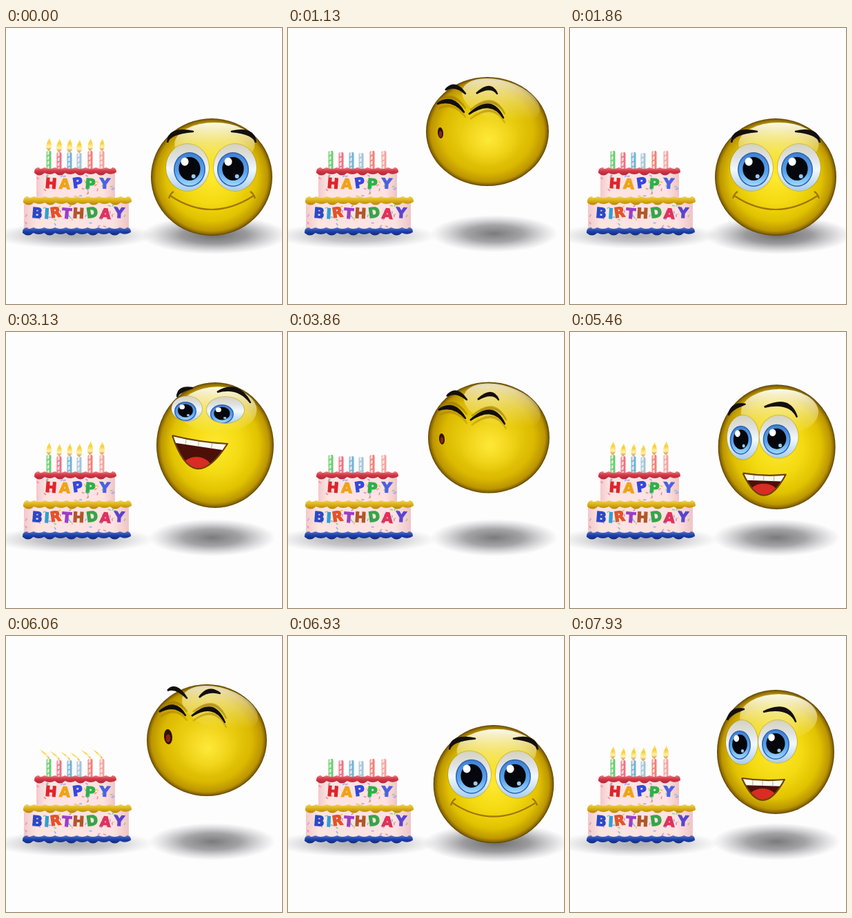
Animation, 400 px wide and 400 px high, one loop 8 s. Source, as an HTML page with a canvas:

```html
<!DOCTYPE html>
<html lang="en">
<head>
<meta charset="utf-8">
<title>Happy Birthday</title>
<style>
  html, body { margin: 0; width: 100%; height: 100%; overflow: hidden; background: #fefdfe; }
  canvas { display: block; width: 400px; height: 400px; }
</style>
</head>
<body>
<canvas id="stage" width="400" height="400"></canvas>
<script>
const ctx = document.getElementById('stage').getContext('2d');
const LOOP = 8000, STEP = 200 / 3, CYCLE = 39;
const TAU = Math.PI * 2;

// Face poses are relative to the ball's centre:
// eyes (white x, y, rx, ry, iris x, y, rx, ry), brows (three points), mouth (corners, lowest point, openness)
const SMILE = [
  -35, -14, 31, 34, -32, -11, 23, 25,   34, -14, 31, 34, 31, -11, 23, 25,
  -64, -50, -54, -63, -27, -66,   64, -50, 54, -63, 29, -66,
  -60, 27, 61, 27, 0, 47, 0];
const GRIN = [
  -49, -14, 23, 32, -52, -10, 16, 21,   3, -15, 28, 31, 0, -11, 20, 22,
  -70, -46, -62, -57, -46, -62,   -18, -58, 12, -61, 29, -44,
  -49, 38, 13, 40, -19, 70, 1];
const LAUGH = [
  -41, -53, 22, 18, -43, -49, 16, 14,   15, -51, 27, 19, 10, -45, 17, 14,
  -55, -70, -49, -79, -33, -83,   3, -77, 30, -80, 51, -62,
  -62, -14, 18, -2, -27, 34, 1];
// Brows, squeezed lids, then the mouth ellipse
const BLOW_OPEN = [
  -57, -72, -44, -74, -29, -61,   -11, -62, 3, -71, 19, -68,
  -69, -41, -48, -48, -31, -36,   -22, -35, 6, -45, 26, -26,
  -56, -5, 6, 11];
const BLOW_TIGHT = [
  -61, -60, -47, -65, -32, -55,   -16, -55, 2, -63, 14, -55,
  -73, -40, -52, -43, -34, -28,   -27, -25, 2, -37, 23, -20,
  -68, 2, 4, 8];

const bodyTrack = [
  [0, [298, 216, 88, 85]], [1, [298, 188, 86, 88]], [2, [298, 168, 85, 90]],
  [8, [303, 164, 85, 91]], [13, [291, 151, 87, 81]], [17, [289, 150, 89, 79]],
  [21, [293, 156, 87, 82]], [25, [298, 214, 87, 86]], [28, [298, 216, 88, 85]],
  [32, [298, 213, 87, 87]], [36, [298, 214, 87, 86]], [39, [298, 216, 88, 85]]];
const faceTrack = [
  [0, SMILE], [2, GRIN], [5, GRIN], [8, LAUGH], [10, LAUGH], [20, GRIN], [24, SMILE], [39, SMILE]];
const blowTrack = [[11, BLOW_OPEN], [13, BLOW_OPEN], [17, BLOW_TIGHT], [20, BLOW_TIGHT]];

const mix = (a, b, p) => a + (b - a) * p;
const clamp = v => Math.max(0, Math.min(1, v));

function sample(track, k) {
  let i = 0;
  while (i < track.length - 2 && k >= track[i + 1][0]) i++;
  const [k0, a] = track[i], [k1, b] = track[i + 1];
  const p = clamp((k - k0) / (k1 - k0));
  return a.map((v, n) => mix(v, b[n], p));
}

function shade(gradient, stops) {
  stops.forEach(([at, color]) => gradient.addColorStop(at, color));
  return gradient;
}
const vertical = (y0, y1, ...stops) => shade(ctx.createLinearGradient(0, y0, 0, y1), stops);

function ellipse(x, y, rx, ry, fill, rot = 0) {
  ctx.beginPath();
  ctx.ellipse(x, y, rx, ry, rot, 0, TAU);
  ctx.fillStyle = fill;
  ctx.fill();
}

// Radial gradient stretched into an ellipse
function glow(x, y, rx, ry, ...stops) {
  ctx.save();
  ctx.translate(x, y);
  ctx.scale(rx, ry);
  ellipse(0, 0, 1, 1, shade(ctx.createRadialGradient(0, 0, 0, 0, 0, 1), stops));
  ctx.restore();
}

const shadow = (x, y, rx, ry, alpha) => glow(x, y, rx, ry,
  [0, `rgba(60,60,64,${alpha})`], [.45, `rgba(70,70,74,${alpha * .72})`],
  [.8, `rgba(90,90,94,${alpha * .25})`], [1, 'rgba(110,110,110,0)']);

// Tapered stroke passing through three points
function crescent([x0, y0, mx, my, x1, y1], width, color) {
  const cx = 2 * mx - (x0 + x1) / 2, cy = 2 * my - (y0 + y1) / 2;
  ctx.beginPath();
  ctx.moveTo(x0, y0);
  ctx.quadraticCurveTo(cx, cy - width, x1, y1);
  ctx.quadraticCurveTo(cx, cy + width, x0, y0);
  ctx.fillStyle = ctx.strokeStyle = color;
  ctx.lineWidth = 2.5;
  ctx.lineJoin = 'round';
  ctx.fill();
  ctx.stroke();
}

function icing(x0, x1, top, bottom, count, colors) {
  const w = (x1 - x0) / count;
  ctx.beginPath();
  ctx.moveTo(x0, bottom - 4);
  ctx.quadraticCurveTo(x0, top, x0 + 7, top);
  for (let i = 0; i < count; i++) {
    const x = x0 + i * w;
    ctx.quadraticCurveTo(x + w / 2, top + 4, Math.min(x + w, x1 - 6), top);
  }
  ctx.quadraticCurveTo(x1, top, x1, bottom - 4);
  for (let i = count; i > 0; i--) {
    const x = x0 + i * w;
    ctx.quadraticCurveTo(x - w / 2, bottom + (i % 2 ? 4 : 1), x - w, bottom - 3);
  }
  ctx.fillStyle = vertical(top, bottom, [0, colors[0]], [.45, colors[1]], [1, colors[2]]);
  ctx.fill();
}

function tier(x, y, w, h, seed) {
  ctx.fillStyle = shade(ctx.createLinearGradient(x, 0, x + w, 0),
    [[0, '#f3c9cb'], [.12, '#fde4e3'], [.85, '#fde2e2'], [1, '#f0c4c6']]);
  ctx.fillRect(x, y, w, h);
  const random = () => (seed = seed * 16807 % 2147483647) / 2147483647;
  for (let i = 0; i < w / 4; i++) {
    ctx.fillStyle = ['#f08aa0', '#8db5ea', '#efc65c', '#8bd08e', '#c79ae0'][i % 5];
    ctx.save();
    ctx.translate(x + 2 + random() * (w - 4), y + 4 + random() * (h - 8));
    ctx.rotate(random() * 3);
    ctx.fillRect(-2, -.8, 4, 1.6);
    ctx.restore();
  }
}

function lettering(word, xs, y, size, colors) {
  ctx.font = `bold ${size}px "DejaVu Sans", sans-serif`;
  ctx.textAlign = 'center';
  ctx.textBaseline = 'middle';
  [...word].forEach((letter, i) => {
    ctx.save();
    ctx.translate(xs[i], y + Math.sin(i * 2.3));
    ctx.rotate(Math.sin(i * 2.1 + .6) * .14);
    ctx.strokeStyle = ctx.fillStyle = colors[i];
    ctx.lineWidth = 1.4;
    ctx.strokeText(letter, 0, 0);
    ctx.fillText(letter, 0, 0);
    ctx.restore();
  });
}

const CANDLES = [[62, 178, '#66cf72'], [77, 180, '#ee7182'], [92, 180, '#6fb5d8'],
  [106, 181, '#9fc7dc'], [122, 178, '#ed8078'], [139, 178, '#f0a5a0']];

function candle(x, y, color) {
  ctx.fillStyle = shade(ctx.createLinearGradient(x - 3.5, 0, x + 3.5, 0),
    [[0, color], [.45, '#fff0ec'], [.7, color], [1, color]]);
  ctx.beginPath();
  ctx.roundRect(x - 3.5, y, 7, 27, 2);
  ctx.fill();
  ctx.strokeStyle = color;
  ctx.lineWidth = 1.6;
  for (let s = 5; s < 24; s += 7) {
    ctx.beginPath();
    ctx.moveTo(x - 3, y + s + 3);
    ctx.lineTo(x + 3, y + s);
    ctx.stroke();
  }
}

function flame(x, y, size, lean) {
  const h = mix(19, 14, lean) * size, w = mix(4.2, 2, lean) * size;
  const tipX = x + 1 - lean * 15;
  ctx.beginPath();
  ctx.moveTo(x, y);
  ctx.bezierCurveTo(x - w * 1.5, y - 3, x - w - lean * 5, y - h * .5, tipX, y - h);
  ctx.bezierCurveTo(x + w - lean * 5, y - h * .5, x + w * 1.5, y - 3, x, y);
  ctx.fillStyle = vertical(y - h, y, [0, '#ffe98a'], [.35, '#f7cf35'], [.7, '#fff3b0'], [1, '#d98e2a']);
  ctx.fill();
}

function cake(k) {
  shadow(98, 301, 118, 19, .42);
  CANDLES.forEach(c => candle(...c));
  tier(44, 210, 114, 38, 77);
  icing(41, 160, 202, 213, 8, ['#e98087', '#d23a48', '#b32736']);
  tier(26, 252, 152, 40, 911);
  icing(25, 182, 244, 256, 10, ['#f2d35a', '#dfb41b', '#b88808']);
  icing(24, 181, 289, 300, 10, ['#5678cf', '#2145ae', '#112a7c']);
  lettering('HAPPY', [65, 85, 104, 122, 143], 227, 20,
    ['#e0242c', '#f0a316', '#3448dc', '#2eb04a', '#4c62e0']);
  lettering('BIRTHDAY', [45, 59, 72, 88, 105, 125, 144, 164], 270, 20,
    ['#2a49c4', '#2f9fd0', '#e3532a', '#9a3fc4', '#b0572c', '#35a548', '#e0325c', '#5a45cf']);

  const lit = k < 15 ? 1 : clamp((k - 33) / 3);
  const lean = k < 15 ? clamp((k - 11) / 2) : 0;
  if (lit && k !== 14) CANDLES.forEach(([x, y], i) =>
    flame(x, y, lit * (1 + .05 * Math.sin(k * 2.1 + i)), lean));
}

function ball([cx, cy, rx, ry], blowing) {
  glow(cx, cy, rx, ry, [0, '#ffe92e'], [.45, '#f3da12'], [.75, '#e1c200'],
    [.92, '#bd9700'], [.97, '#8f6c00'], [1, '#5c4300']);
  ctx.save();
  ctx.translate(cx, cy);
  ctx.scale(rx, ry);
  if (blowing) {
    ellipse(0, 0, .95, .95, 'rgba(190,145,0,.2)');
    ellipse(.02, .15, .55, .5, shade(ctx.createRadialGradient(.02, .15, 0, .02, .15, .5),
      [[0, 'rgba(255,235,60,.9)'], [1, 'rgba(255,225,40,0)']]));
  }
  ellipse(blowing ? .22 : .05, -.56, .66, .37,
    vertical(-.93, -.2, [0, `rgba(255,255,248,${blowing ? .72 : .95})`], [1, 'rgba(255,250,190,0)']),
    blowing ? .35 : 0);
  ctx.restore();
}

function eye([x, y, rx, ry, ix, iy, irx, iry]) {
  ellipse(x, y, rx + 1, ry + 1, 'rgba(150,125,40,.4)');
  ellipse(x, y, rx, ry, vertical(y - ry, y + ry,
    [0, '#d6d2bd'], [.3, '#dfe2e2'], [.55, '#f2f8fd'], [1, '#a9cdee']));
  ctx.save();
  ctx.clip();
  ellipse(ix, iy, irx, iry, '#2c62b0');
  ellipse(ix, iy, irx - 1.5, iry - 1.5, vertical(iy - iry, iy + iry,
    [0, '#3f7fd2'], [.6, '#5aa5ee'], [1, '#a4dcff']));
  ellipse(ix, iy - 1, irx * .68, iry * .68, '#05070c');
  ellipse(ix - irx * .3, iy - iry * .45, irx * .24, iry * .24, '#fff');
  ellipse(ix + irx * .25, iy + iry * .4, irx * .13, iry * .12, '#9cc9f2');
  ctx.restore();
}

function mouth([x0, y0, x1, y1, bx, by, open]) {
  const midY = (y0 + y1) / 2;
  const lowY = 2 * by - midY, lowX = 2 * bx - (x0 + x1) / 2;
  const topY = mix(lowY, midY + 4, open), topX = mix(lowX, (x0 + x1) / 2, open);
  ctx.beginPath();
  ctx.moveTo(x0, y0);
  ctx.quadraticCurveTo(lowX, lowY, x1, y1);
  ctx.quadraticCurveTo(topX, topY, x0, y0);
  if (open > .1) {
    ctx.fillStyle = '#4d1008';
    ctx.fill();
    ctx.save();
    ctx.clip();
    ellipse(bx, by - 2, 21, 15, '#d92c22');
    ctx.translate(x0, y0);
    ctx.rotate(Math.atan2(y1 - y0, x1 - x0));
    const width = Math.hypot(x1 - x0, y1 - y0);
    ctx.fillStyle = '#fbfaf4';
    ctx.beginPath();
    ctx.roundRect(2, -2, width - 4, 12, 4);
    ctx.fill();
    ctx.fillStyle = '#b9aa9c';
    [.25, .48, .72].forEach(p => ctx.fillRect(width * p, 2, 1, 8));
    ctx.restore();
  }
  ctx.beginPath();
  ctx.moveTo(x0, y0);
  ctx.quadraticCurveTo(lowX, lowY, x1, y1);
  ctx.quadraticCurveTo(topX, topY, x0, y0);
  ctx.strokeStyle = open > .4 ? '#6b4300' : '#a27500';
  ctx.lineWidth = 2.2;
  ctx.stroke();
  if (open < .3) {
    ctx.beginPath();
    ctx.moveTo(x0 - 2, y0 + 4);
    ctx.quadraticCurveTo(x0, y0 - 3, x0 + 5, y0 - 6);
    ctx.moveTo(x1 + 2, y1 + 4);
    ctx.quadraticCurveTo(x1, y1 - 3, x1 - 5, y1 - 6);
    ctx.stroke();
  }
}

function openFace(f) {
  eye(f.slice(0, 8));
  eye(f.slice(8, 16));
  crescent(f.slice(16, 22), 5, '#14100c');
  crescent(f.slice(22, 28), 5, '#14100c');
  mouth(f.slice(28));
}

function blowFace(f) {
  [12, 18].forEach(n => {
    const lid = f.slice(n, n + 6);
    const fold = lid.map((v, i) => i % 2 ? v - 6 : v + 2);
    const under = lid.map((v, i) => i % 2 ? v + 7 : v + 2);
    crescent(fold, 3, 'rgba(160,125,0,.5)');
    crescent(under, 2, 'rgba(165,125,0,.35)');
    crescent(lid, 4.5, '#120e08');
  });
  crescent(f.slice(0, 6), 4, '#14100c');
  crescent(f.slice(6, 12), 4, '#14100c');
  const [x, y, rx, ry] = f.slice(24);
  ellipse(x, y, rx, ry, '#2d1400', -.08);
  ellipse(x, y + ry * .2, rx * .55, ry * .55, '#8d2412');
}

function draw(now) {
  const k = Math.floor((now % LOOP + 8) / STEP) % 120 % CYCLE;
  const body = sample(bodyTrack, k);
  const blowing = k >= 11 && k < 20;
  const lift = clamp((216 - body[1]) / 50);

  ctx.fillStyle = '#fefdfe';
  ctx.fillRect(0, 0, 400, 400);
  cake(k);
  shadow(mix(302, 299, lift), mix(300, 298, lift), mix(106, 92, lift), mix(28, 27, lift), mix(.75, .68, lift));
  ball(body, blowing);
  ctx.save();
  ctx.translate(body[0], body[1]);
  if (blowing) blowFace(sample(blowTrack, k));
  else openFace(sample(faceTrack, k));
  ctx.restore();
  requestAnimationFrame(tick);
}

const start = performance.now();
function tick() { draw(Math.max(0, performance.now() - start)); }
tick();
</script>
</body>
</html>
```
